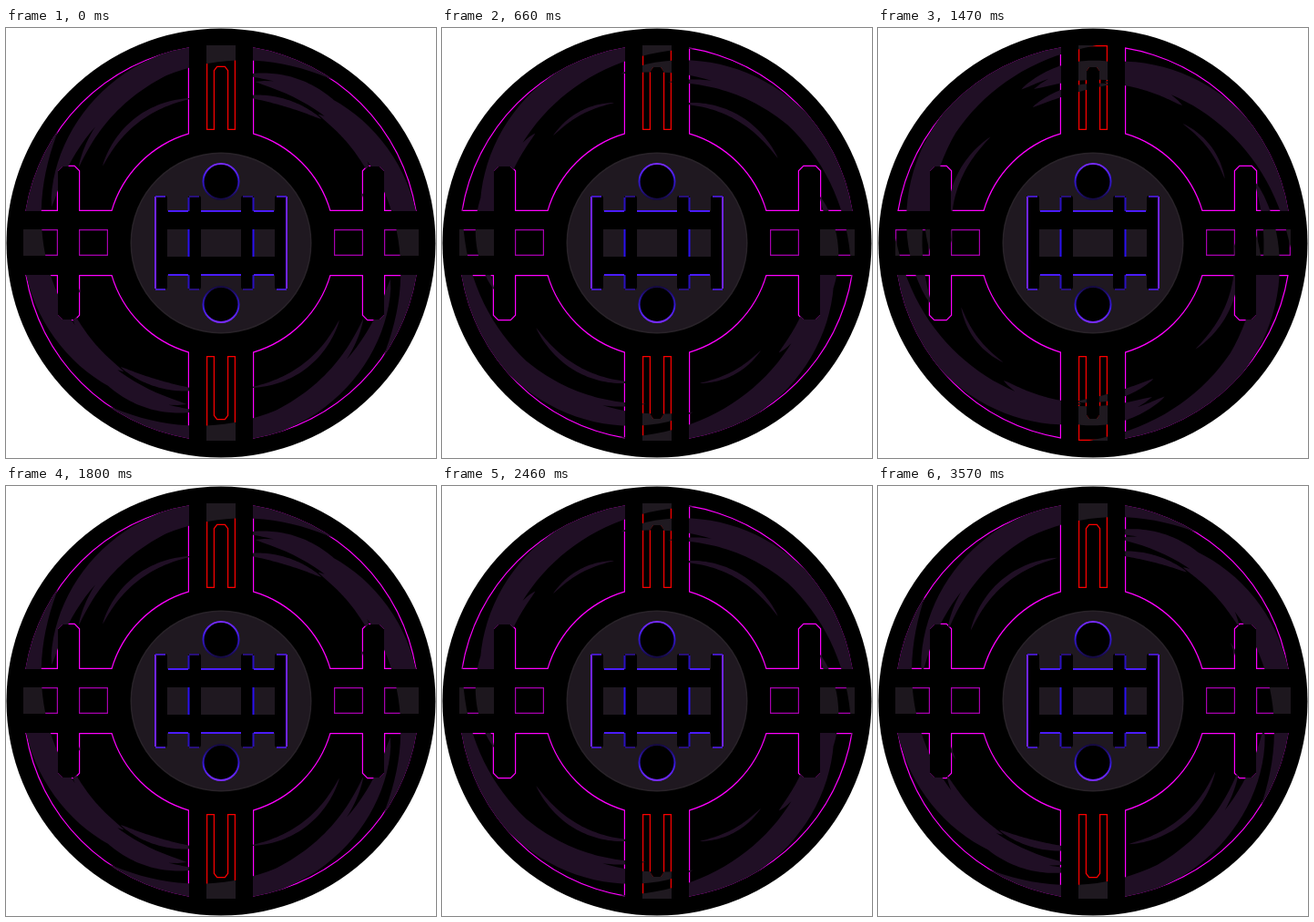
Animation, 472 px wide and 472 px high, one loop 3.6 s. Source, as an HTML page with a canvas:

```html
<!DOCTYPE html>
<html>
<head>
<meta charset="utf-8">
<style>
html, body { margin: 0; width: 100%; height: 100%; overflow: hidden; background: #fff; }
canvas { display: block; }
</style>
</head>
<body>
<canvas id="stage" width="472" height="472"></canvas>
<script>
const ctx = document.getElementById('stage').getContext('2d');
const LOOP = 3600, STEP = 30;
const RIM = 217.5, HUB = 124.5, ARM = 35;
const RAD = Math.PI / 180;

// All geometry is centred on the origin and mirrored into place.
function mirrored(path, flips) {
  const all = new Path2D();
  for (const [sx, sy] of flips) all.addPath(path, new DOMMatrix([sx, 0, 0, sy, 0, 0]));
  return all;
}

function polygon(points) {
  const path = new Path2D();
  points.forEach(([x, y], i) => i ? path.lineTo(x, y) : path.moveTo(x, y));
  path.closePath();
  return path;
}

function quadrant() {
  const path = new Path2D();
  const outer = Math.asin(ARM / RIM), inner = Math.asin(ARM / HUB);
  path.arc(0, 0, RIM, Math.PI + outer, 1.5 * Math.PI - outer);
  path.arc(0, 0, HUB, 1.5 * Math.PI - inner, Math.PI + inner, true);
  path.closePath();
  path.addPath(polygon([[-179, -35], [-179, -79], [-174, -84], [-161, -84], [-156, -79], [-156, -35]]));
  return path;
}

function sideWindow() {
  const path = new Path2D();
  path.rect(-217, -15, 38, 29);
  path.rect(-156, -15, 32, 29);
  return path;
}

const topWindow = polygon([
  [-16, -217], [16, -217], [16, -124], [7, -124], [7, -189], [4, -193],
  [-4, -193], [-7, -189], [-7, -124], [-16, -124]
]);

const regions = [
  { path: mirrored(quadrant(), [[1, 1], [-1, 1], [1, -1], [-1, -1]]), line: '#f0f', fill: '#200f25' },
  { path: mirrored(sideWindow(), [[1, 1], [-1, 1]]), line: '#a800b0', fill: '#1d171e' },
  { path: mirrored(topWindow, [[1, 1], [1, -1]]), line: '#f00', fill: '#1f1920' }
];

// A tapered arc; angles run clockwise from the top, bow lifts the middle outward.
function blade(from, to, r0, r1, width, bow = 0) {
  const outer = [], inner = [];
  for (let i = 0; i <= 40; i++) {
    const u = i / 40, a = (from + (to - from) * u) * RAD;
    const swell = Math.sin(Math.PI * u);
    const r = r0 + (r1 - r0) * u + bow * swell;
    const half = width / 2 * Math.pow(swell, 0.7);
    outer.push([Math.sin(a) * (r + half), -Math.cos(a) * (r + half)]);
    inner.unshift([Math.sin(a) * (r - half), -Math.cos(a) * (r - half)]);
  }
  return polygon(outer.concat(inner));
}

const swirl = new Path2D();
for (const turn of [0, 180]) {
  for (const [from, to, ...shape] of [
    [12, 126, 181, 219, 27],
    [-78, 36, 190, 219, 24],
    [-62, -14, 177, 196, 8, 2],
    [-57, -11, 155, 162, 6, 5],
    [8, 43, 186, 198, 10, 2],
    [9, 39, 163, 175, 8],
    [37, 66, 177, 180, 9, 3],
    [70, 97, 164, 161, 4, 3]
  ]) swirl.addPath(blade(from + turn, to + turn, ...shape));
}

function disc(x, y, r, color) {
  ctx.fillStyle = color;
  ctx.beginPath();
  ctx.arc(x, y, r, 0, 2 * Math.PI);
  ctx.fill();
}

function line(x1, y1, x2, y2, color) {
  ctx.strokeStyle = color;
  ctx.beginPath();
  ctx.moveTo(x1, y1);
  ctx.lineTo(x2, y2);
  ctx.stroke();
}

function drawHub() {
  disc(0, 0, 99.5, '#292329');
  disc(0, 0, 98, '#1f1820');

  ctx.lineWidth = 2;
  for (const side of [-1, 1]) {
    const y = side * 67.5;
    const glow = ctx.createLinearGradient(0, y + side * 20, 0, y - side * 20);
    glow.addColorStop(0, '#7a2cff');
    glow.addColorStop(0.45, '#3518d8');
    glow.addColorStop(1, '#150a40');
    disc(0, y, 20, '#000');
    ctx.strokeStyle = glow;
    ctx.beginPath();
    ctx.arc(0, y, 19.5, 0, 2 * Math.PI);
    ctx.stroke();
  }

  ctx.fillStyle = '#000';
  for (const x of [-73, -36, 22, 59]) {
    ctx.beginPath();
    ctx.roundRect(x, -52, 14, 103, 3);
    ctx.fill();
  }
  ctx.fillRect(-72, -35, 144, 20);
  ctx.fillRect(-72, 15, 144, 20);

  for (const side of [-1, 1]) {
    line(side * 72, -51, side * 72, 50, '#7024ff');
    line(side * 35.5, -15, side * 35.5, 15, '#2a10f0');
    for (const end of [-1, 1]) {
      line(side * 72, end * 51, side * 61, end * 51, '#4318c0');
      line(side * 35, end * 51, side * 24, end * 51, '#28107a');
      line(side * 35.5, end * 35, side * 35.5, end * 50, '#2a10c0');
      line(side * 36, end * 35, side * 58, end * 35, '#4a1cff');
    }
    line(-22, side * 35, 22, side * 35, '#4a1cff');
  }
}

function drawRegion({ path, line: edge, fill }, angle) {
  ctx.save();
  ctx.clip(path, 'evenodd');
  ctx.strokeStyle = edge;
  ctx.lineWidth = 2.4;
  ctx.stroke(path);
  ctx.rotate(angle);
  ctx.fillStyle = fill;
  ctx.fill(swirl);
  ctx.restore();
}

function draw(now) {
  const step = Math.floor((now % LOOP) / STEP);
  const angle = step * STEP / LOOP * 2 * Math.PI;
  ctx.setTransform(1, 0, 0, 1, 0, 0);
  ctx.fillStyle = '#fff';
  ctx.fillRect(0, 0, 472, 472);
  ctx.translate(236, 236);
  disc(0, 0, 235.5, '#000');
  for (const region of regions) drawRegion(region, angle);
  drawHub();
}

const start = performance.now();
function tick() {
  draw(performance.now() - start);
  requestAnimationFrame(tick);
}
tick();
</script>
</body>
</html>
```
